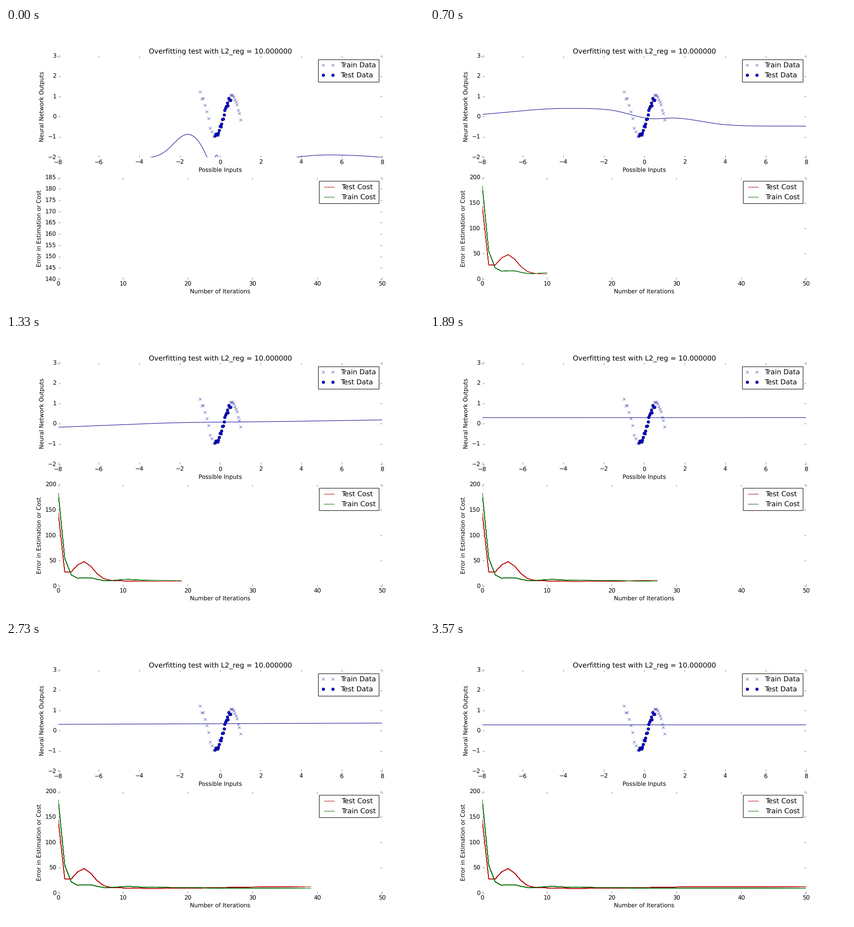
Write a matplotlib script that moves like this. It is 916 by 611 pixels and loops after 3640 ms.

```python
import numpy as np
import matplotlib.pyplot as plt
from matplotlib.animation import FuncAnimation

W, H, DPI = 916, 611, 72
SCALE = H / 8 / DPI          # the layout is designed for 12 x 8 inches
FRAMES, INTERVAL = 52, 70
CURVE, CROSS, DOT = "#000090", "#000088", "#0000e8"
RED, GREEN = "#b80808", "#006c00"

plt.style.use("classic")
plt.rcParams.update({"savefig.dpi": "figure", "figure.facecolor": "white",
                     "font.family": "DejaVu Sans", "text.hinting": "none"})
for key in ("font.size", "lines.linewidth", "lines.markersize",
            "lines.markeredgewidth", "patch.linewidth",
            "axes.labelpad", "axes.titlepad",
            "xtick.major.size", "xtick.major.width", "xtick.major.pad",
            "ytick.major.size", "ytick.major.width", "ytick.major.pad"):
    plt.rcParams[key] *= SCALE


def bump(x, center, height, width):
    return height * np.exp(-((x - center) / width) ** 2 / 2)


def spline(points, x):
    """Cubic Hermite curve through a few (x, y) points."""
    xk, yk = np.array(points, float).T
    slope = np.gradient(yk, xk)
    i = np.clip(np.searchsorted(xk, x) - 1, 0, len(xk) - 2)
    h = xk[i + 1] - xk[i]
    t = (x - xk[i]) / h
    return ((1 + 2 * t) * (1 - t) ** 2 * yk[i] + t * (1 - t) ** 2 * h * slope[i]
            + t * t * (3 - 2 * t) * yk[i + 1] + t * t * (t - 1) * h * slope[i + 1])


def initial_output(x):
    d = x + 1.6
    hump = np.where(d < 0, -2.035 + bump(d, 0, 1.17, 0.7),
                    -0.865 - 1.26 * d * d)
    spike = -1.89 - 17 * (x + 0.18) ** 2
    e = x - 5.37
    swell = -1.88 - 0.12 * (e / np.where(e < 0, 1.64, 2.63)) ** 2
    return np.maximum(np.maximum(hump, spike), swell)


grid = np.linspace(-8, 8, 641)
start = initial_output(grid)
wavy = spline([(-8, 0.12), (-4, 0.41), (-1.7, 0.335), (0.5, -0.1),
               (1.3, -0.06), (4, -0.39), (8, -0.465)], grid)
bent = spline([(-8, -0.17), (-1.5, 0.065), (1.5, 0.093), (8, 0.19)], grid)


def straight(step):
    level = 0.29 + bump(step, 36, 0.07, 5)
    tilt = bump(step, 35, 0.0115, 2.7)
    return level + tilt * grid


def output(step):
    """Network output, flattening from the start curve to a line."""
    if step < 10:
        keep = (0.55 ** step - 0.55 ** 10) / (1 - 0.55 ** 10)
        return wavy + keep * (start - wavy)
    if step < 19:
        return wavy + (step - 10) / 9 * (bent - wavy)
    return bent + min((step - 19) / 8, 1) * (straight(step) - bent)


# Noisy samples of a sine wave
rng = np.random.default_rng(3)
train_x = np.r_[np.linspace(-1, -0.25, 10), np.linspace(0.5, 1, 10)]
train_y = 1.08 * np.sin(4 * train_x - 0.72) + 0.02 + rng.normal(0, 0.06, 20)
test_x = np.linspace(-0.25, 0.5, 20)
test_y = 0.95 * np.sin(4 * test_x - 0.62) + rng.normal(0, 0.07, 20)

# Costs per iteration: fast decay with a few swings
steps = np.arange(FRAMES)
test_cost = (9.2 + 134 * 0.095 ** steps + bump(steps, 3.9, 39, 1.5)
             + bump(steps, 8.5, 1.3, 2) + 3.4 / (1 + np.exp((25 - steps) / 3)))
train_cost = (9.6 + 174.3 * 0.26 ** steps + bump(steps, 4.6, 6.8, 1.2)
              + bump(steps, 10.6, 2.7, 1.5) + bump(steps, 16, 1.6, 5))

fig, (top, low) = plt.subplots(2, 1, figsize=(W / DPI, H / DPI), dpi=DPI)
for ax in (top, low):
    ax.set_frame_on(False)

top.set_title("Overfitting test with L2_reg = 10.000000")
top.set(xlabel="Possible Inputs", ylabel="Neural Network Outputs",
        xlim=(-8, 8), ylim=(-2, 3))
top.plot(train_x, train_y, "x", color=CROSS, label="Train Data")
top.plot(test_x, test_y, "o", color=DOT, label="Test Data")
curve, = top.plot(grid, output(0), color=CURVE)
top.legend(loc="upper right")

low.set(xlabel="Number of Iterations", ylabel="Error in Estimation or Cost",
        xlim=(0, 50))
# Every iteration draws its history again, so older parts look heavier
history = []
for n in range(1, FRAMES + 1):
    history.append([
        low.plot(steps[:n], cost[:n], color=color,
                 label=name if n == 1 else "_nolegend_")[0]
        for cost, color, name in ((test_cost, RED, "Test Cost"),
                                  (train_cost, GREEN, "Train Cost"))])
low.legend(loc="upper right")


def cost_axis(step):
    if step == 0:
        lo, hi, gap = 140, 185, 5
    elif step < 3:
        lo, hi, gap = 20, 200, 20
    else:
        lo, hi, gap = 0, 200, 50
    low.set_yticks(np.arange(lo, hi + 1, gap))
    low.set_ylim(lo, hi)


def update(step):
    curve.set_ydata(output(step))
    cost_axis(step)
    for n, pair in enumerate(history):
        for line in pair:
            line.set_visible(n <= step)
    return []


update(0)
anim = FuncAnimation(fig, update, frames=FRAMES, interval=INTERVAL,
                     repeat=True, repeat_delay=0, blit=False)
plt.show()
```
